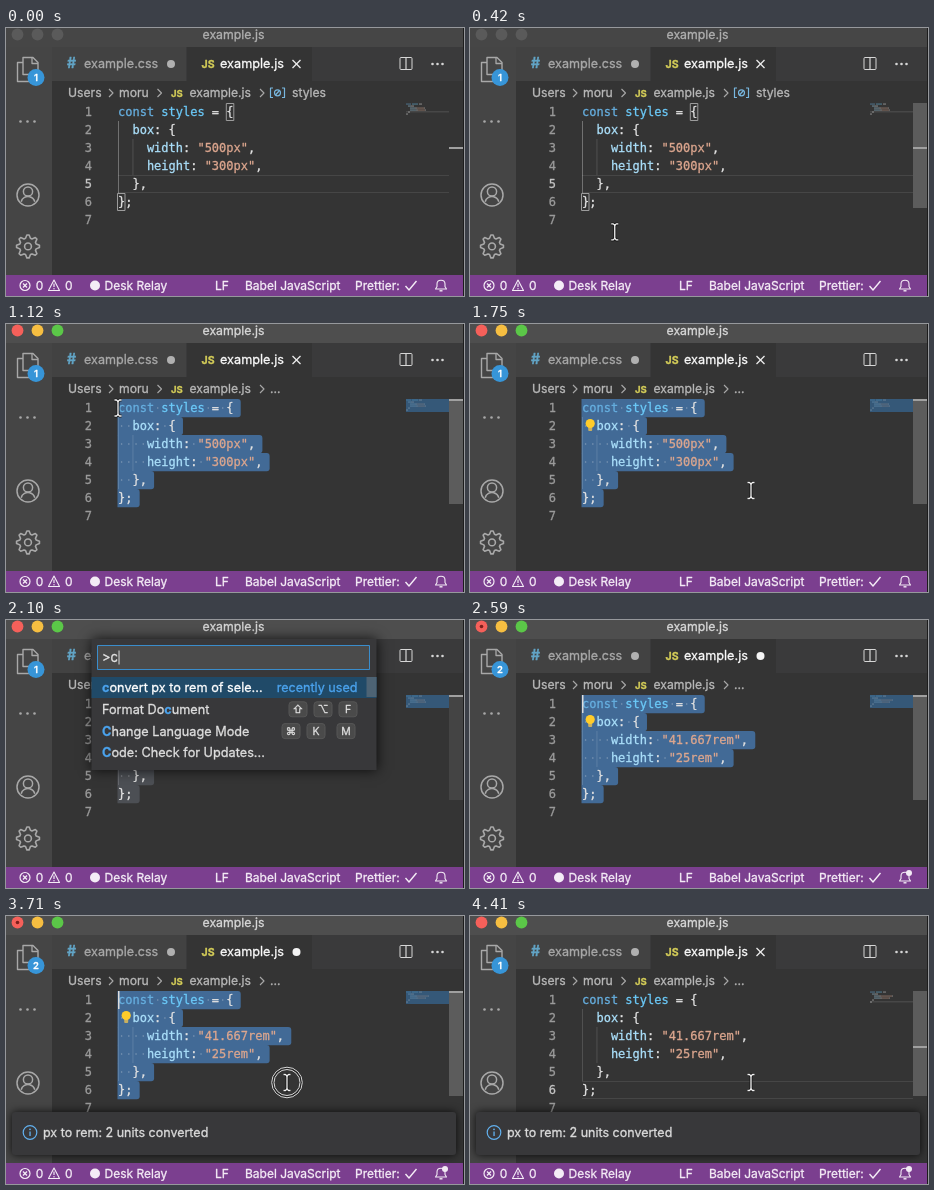
Recreate the animation shown at these times as an HTML page with a canvas. Size 458x268 px, loop 4480 ms.

```html
<!DOCTYPE html>
<html lang="en">
<head>
<meta charset="utf-8">
<title>Unit conversion in an editor</title>
<style>
html, body { margin: 0; width: 100%; height: 100%; overflow: hidden; background: #343434; }
canvas { display: block; width: 458px; height: 268px; }
</style>
</head>
<body>
<canvas id="stage"></canvas>
<script>
const W = 458, H = 268, LOOP = 4480, STEP = 70;
const UI = 'Inter, "Open Sans", sans-serif';
const MONO = '"DejaVu Sans Mono", monospace';
const CHAR = 7.22, LINE = 18, LEFT = 112, TOP = 75;
const C = {
  title: '#4e4e4e', bar: '#454545', strip: '#3a3a3b', tab: '#424242', editor: '#343434',
  panel: '#38383a', status: '#7b3f8f', select: '#426a96', blurred: '#4c4f54',
  text: '#e2e2e2', dim: '#a8a8a8', keyword: '#66afe0', name: '#6bc9f8', prop: '#aadffa',
  string: '#dca68e', blue: '#4ba3ee', js: '#d3cc58'
};
const canvas = document.getElementById('stage');
const g = canvas.getContext('2d');
const ratio = Math.max(1, window.devicePixelRatio || 1);
canvas.width = W * ratio;
canvas.height = H * ratio;

const rect = (x, y, w, h, color) => { g.fillStyle = color; g.fillRect(x, y, w, h); };

function round(x, y, w, h, r, fill, stroke) {
  g.beginPath();
  g.roundRect(x, y, w, h, r);
  if (fill) { g.fillStyle = fill; g.fill(); }
  if (stroke) { g.strokeStyle = stroke; g.lineWidth = 1; g.stroke(); }
}

function circle(x, y, r, fill, stroke, width = 1.2) {
  g.beginPath();
  g.arc(x, y, r, 0, Math.PI * 2);
  if (fill) { g.fillStyle = fill; g.fill(); }
  if (stroke) { g.strokeStyle = stroke; g.lineWidth = width; g.stroke(); }
}

function path(points, color, width = 1.2, closed = false) {
  g.beginPath();
  points.forEach(([x, y], i) => i ? g.lineTo(x, y) : g.moveTo(x, y));
  if (closed) g.closePath();
  g.strokeStyle = color;
  g.lineWidth = width;
  g.stroke();
}

// A hairline outline gives the slightly heavier look of smoothed type.
function text(str, x, y, size = 12, color = C.text, { align = 'left', font = UI, weight = 400 } = {}) {
  g.font = `${weight} ${size}px ${font}`;
  g.textAlign = align;
  g.fillStyle = g.strokeStyle = color;
  g.lineWidth = .3;
  g.fillText(str, x, y);
  g.strokeText(str, x, y);
  return x + g.measureText(str).width;
}

function dots(x, y, color, gap = 6) {
  for (let i = -1; i <= 1; i++) circle(x + i * gap, y, 1.3, color);
}

function withShadow(blur, draw) {
  g.save();
  g.shadowColor = 'rgba(0,0,0,.8)';
  g.shadowBlur = blur * ratio;
  draw();
  g.restore();
}

const lineTop = n => TOP + (n - 1) * LINE;

function codeLines(converted) {
  const [w, h] = converted ? ['41.667rem', '25rem'] : ['500px', '300px'];
  const entry = (key, value) =>
    [['    ' + key, C.prop], [': ', C.text], [`"${value}"`, C.string], [',', C.text]];
  return [
    [['const', C.keyword], [' styles', C.name], [' = {', C.text]],
    [['  box', C.prop], [': {', C.text]],
    entry('width', w),
    entry('height', h),
    [['  },', C.text]],
    [['};', C.text]],
    []
  ];
}

// Pointer track: time, x, y
const track = [
  [210, 300, 268], [490, 116, 192], [630, 114, 191], [770, 133, 150],
  [840, 141, 94], [980, 112, 84], [1120, 112, 84], [1540, 281, 166.5]
];

function pointerAt(t) {
  let i = track.findIndex(p => p[0] > t);
  if (i < 0) return track[track.length - 1].slice(1);
  i = Math.max(1, i);
  const [t0, x0, y0] = track[i - 1], [t1, x1, y1] = track[i];
  const u = Math.max(0, (t - t0) / (t1 - t0)), e = u * u * (3 - 2 * u);
  return [x0 + (x1 - x0) * e, y0 + (y1 - y0) * e];
}

function selectionAt(t) {
  if (t < 840 || t >= 3850) return null;
  if (t < 910) return [6, 2];
  return t < 980 ? [2, 2] : [1, 0];
}

function stateAt(t) {
  const converted = t >= 2520;
  const selection = selectionAt(t);
  const line = selection ? 0 : t < 560 ? 5 : t < 840 ? 7 : 6;
  return {
    t, converted, selection, line,
    focused: t >= 560,
    dirty: converted && t < 4200,
    caretLine: selection ? selection[0] : line,
    palette: t >= 1890 && t < 2520,
    typed: t >= 2100 ? '>c' : '>',
    hover: t >= 280,
    pointer: (t >= 210 && t < 1820) || t >= 3570,
    pressed: (t >= 560 && t < 1120) || (t >= 3640 && t < 3850),
    toast: Math.min(1, Math.max(0, (t - 2800) / 280))
  };
}

function drawTitle(s) {
  rect(0, 0, W, 19, s.focused ? C.title : '#464646');
  const lights = s.focused ? ['#f5605a', '#f6be41', '#5bc748'] : ['#5a5a5a', '#5a5a5a', '#5a5a5a'];
  lights.forEach((c, i) => circle(11.5 + i * 20, 6.5, 5.9, c));
  if (s.dirty) circle(11.5, 6.5, 1.8, '#7c1f1b');
  text('example.js', 227.5, 11, 12.3, s.focused ? '#d8d8d8' : '#b0b0b0', { align: 'center' });
}

function drawActivity(s) {
  rect(0, 19, 46, 228, C.bar);
  const ink = '#a8a8a8';
  path([[17, 46.5], [17, 29.5], [27, 29.5], [32, 34.5], [32, 46.5]], ink, 1.4, true);
  path([[26, 29.5], [26, 35.5], [32, 35.5]], ink, 1.3);
  path([[17, 34.5], [11.5, 34.5], [11.5, 53.5], [25, 53.5], [25, 47.5]], ink, 1.4);
  circle(30, 49.4, 8.5, '#3795d8');
  text(s.dirty ? '2' : '1', 30, 52.8, 9.5, '#fff', { align: 'center', weight: 600 });
  dots(21.5, 93.5, ink, 7);
  circle(22, 167, 11, null, ink, 1.5);
  circle(22, 163.5, 4.6, null, ink, 1.5);
  g.beginPath();
  g.arc(22, 175.5, 7, Math.PI * 1.08, Math.PI * 1.92);
  g.stroke();
  const gear = [];
  for (let i = 0; i < 32; i++) {
    const a = (i - .5) * Math.PI / 16, r = i % 4 < 2 ? 11.5 : 8.5;
    gear.push([22 + r * Math.cos(a), 218.4 + r * Math.sin(a)]);
  }
  path(gear, ink, 1.6, true);
  circle(22, 218.4, 3.4, null, ink, 1.6);
}

function drawTabs(s) {
  rect(46, 19, W - 46, 34, C.strip);
  rect(46, 19, 134, 34, C.tab);
  rect(181, 19, 125, 34, C.editor);
  text('#', 61, 40.3, 14, '#62a4c5', { weight: 700 });
  text('example.css', 78, 39.8, 12.6, C.dim);
  circle(165, 36, 4, '#b0b0b0');
  text('JS', 195.5, 39.5, 10.5, C.js, { weight: 700 });
  text('example.js', 214, 39.8, 12.7, '#fafafa');
  if (s.dirty) circle(290.5, 36, 4, '#f4f4f4');
  else {
    path([[286.5, 32], [294.5, 40]], '#eee', 1.3);
    path([[294.5, 32], [286.5, 40]], '#eee', 1.3);
  }
  round(394, 29.5, 12, 12, 1, null, '#d6d6d6');
  path([[400, 29.5], [400, 41.5]], '#d6d6d6');
  dots(431.5, 36, '#d6d6d6', 5);
}

function chevron(x) {
  path([[x - 2, 61], [x + 2, 65], [x - 2, 69]], C.dim, 1.1);
}

function drawBreadcrumb(s) {
  const crumb = (str, x) => text(str, x, 69, 12.2, '#b8b8b8');
  crumb('Users', 62);
  chevron(105);
  crumb('moru', 113);
  chevron(153.5);
  text('JS', 165, 68.5, 9.5, C.js, { weight: 700 });
  crumb('example.js', 183.5);
  chevron(256);
  if (s.focused) return void crumb('...', 264);
  path([[267, 60], [264.5, 60], [264.5, 69.5], [267, 69.5]], '#78b7df');
  path([[276, 60], [278.5, 60], [278.5, 69.5], [276, 69.5]], '#78b7df');
  circle(271.5, 64.8, 3, null, '#78b7df');
  path([[269.5, 67], [273.5, 62.5]], '#78b7df');
  crumb('styles', 286);
}

function drawMinimap(s, lines) {
  const all = s.selection && s.selection[0] === 1;
  if (all) rect(400, 75, 43, 13, '#355878');
  else rect(400, 75 + (s.caretLine - 1) * 2, 43, 1.5, s.selection ? '#3c5b7a' : '#474747');
  lines.forEach((line, i) => {
    let x = 400;
    for (const [str, color] of line) {
      const body = str.trimStart();
      x += str.length - body.length;
      g.globalAlpha = all ? .25 : .45;
      rect(x, 75.5 + i * 2, body.length, 1.1, color);
      g.globalAlpha = 1;
      x += body.length;
    }
  });
  if (s.hover) rect(443, 75, 15, 105, s.palette ? '#444' : '#5c5c5c');
  rect(443, 75 + (s.caretLine - 1) * 11, 15, 2, '#a0a0a0');
}

function drawBulb() {
  round(118.2, 102.5, 4, 4.5, 1, '#c8b060');
  circle(120.2, 99.5, 4.6, '#ffcc2a');
}

function drawEditor(s) {
  rect(46, 53, W - 46, 194, C.editor);
  const lines = codeLines(s.converted);
  const lengths = lines.map(l => l.reduce((n, [str]) => n + str.length, 0));
  drawBreadcrumb(s);

  if (s.line) {
    const y = lineTop(s.line);
    rect(LEFT, y, 331, 1, '#464646');
    rect(LEFT, y + 17, 331, 1, '#464646');
  }
  if (s.selection) {
    const [first, col] = s.selection;
    for (let n = first; n <= 6; n++) {
      const start = n === first ? col : 0;
      round(LEFT - .5 + start * CHAR, lineTop(n), (lengths[n - 1] - start + 1) * CHAR + .5, LINE + .3,
        [0, 3, 3, 0], s.palette ? C.blurred : C.select);
    }
  }
  rect(LEFT, lineTop(2), 1, LINE * 4, `rgba(255,255,255,${s.focused ? .14 : .3})`);
  rect(LEFT + 2 * CHAR, lineTop(3), 1, LINE * 2, 'rgba(255,255,255,.14)');

  lines.forEach((line, i) => {
    const n = i + 1, base = lineTop(n) + 13;
    text(String(n), 86, base, 12, n === s.line ? '#c4c4c4' : '#9a9a9a', { align: 'right', font: MONO });
    let col = 0;
    for (const [str, color] of line) {
      text(str, LEFT + col * CHAR, base, 12, color, { font: MONO });
      for (const ch of str) {
        if (ch === ' ' && s.selection && s.selection[0] <= n)
          circle(LEFT + (col + .5) * CHAR, base - 4, .8, 'rgba(225,230,235,.38)');
        col++;
      }
    }
  });

  if (!s.focused) {
    round(LEFT + 15 * CHAR, TOP + .5, 7.5, 17, 0, null, '#9c9c9c');
    round(LEFT - .5, lineTop(6) + .5, 7.5, 17, 0, null, '#9c9c9c');
  }
  if (s.t >= 840 && s.t < 910) rect(126, lineTop(6), 1, LINE, '#ccc');
  if (s.t >= 2520 && s.t < 3850 && (s.t - 2520) % 1000 < 500 || s.t >= 3640 && s.t < 3850)
    rect(LEFT, TOP, 1.5, LINE, '#ddd');
  if (s.t >= 3850 && s.t < 4340) rect(126, lineTop(6), 1.5, LINE, '#ddd');
  if (s.selection && s.t >= 1400) drawBulb();
  drawMinimap(s, lines);
}

function drawBell(alert) {
  const ink = '#f2eaf4';
  g.beginPath();
  g.moveTo(429.5, 261);
  g.lineTo(431, 258.5);
  g.lineTo(431, 256);
  g.bezierCurveTo(431, 251, 439, 251, 439, 256);
  g.lineTo(439, 258.5);
  g.lineTo(440.5, 261);
  g.closePath();
  g.strokeStyle = ink;
  g.lineWidth = 1.1;
  g.stroke();
  path([[433.5, 262.8], [436.5, 262.8]], ink, 1.4);
  if (alert) circle(439, 253, 3, ink);
}

function drawStatus(s) {
  rect(0, 247, W, 21, C.status);
  const ink = '#f4ecf6', label = (str, x) => text(str, x, 262, 12, ink);
  circle(19, 257.5, 5, null, ink);
  path([[17, 255.5], [21, 259.5]], ink);
  path([[21, 255.5], [17, 259.5]], ink);
  label('0', 29.8);
  path([[48, 252], [53.5, 262.5], [42.5, 262.5]], ink, 1.1, true);
  path([[48, 255.5], [48, 259]], ink);
  circle(48, 260.7, .7, ink);
  label('0', 59);
  circle(89, 257.5, 5, ink);
  label('Desk Relay', 98.5);
  label('LF', 209);
  label('Babel JavaScript', 239);
  label('Prettier:', 349);
  path([[399.5, 258], [403, 262], [410.5, 253]], ink, 1.4);
  drawBell(s.converted);
}

function drawToast(p) {
  if (!p) return;
  const ease = 1 - (1 - p) ** 3;
  g.save();
  g.beginPath();
  g.rect(0, 0, W, 247);
  g.clip();
  g.translate(0, (1 - ease) * 50);
  withShadow(8, () => round(6, 196, 444, 43, 3, C.panel));
  circle(24, 216.5, 6.8, null, '#62b1ef', 1.2);
  rect(23.4, 215.5, 1.3, 4.5, '#62b1ef');
  circle(24, 213.3, .9, '#62b1ef');
  text('px to rem: 2 units converted', 37, 221, 12.5, '#dadada');
  g.restore();
}

const commands = [
  { label: 'convert px to rem of sele...', hit: 0 },
  { label: 'Format Document', hit: 9, keys: [['⇧', 283], ['⌥', 308], ['F', 333]] },
  { label: 'Change Language Mode', hit: 0, keys: [['⌘', 276], ['K', 301], ['M', 331]] },
  { label: 'Code: Check for Updates...', hit: 0 }
];

function drawPalette(s) {
  if (!s.palette) return;
  withShadow(12, () => rect(85.5, 19, 285, 131, C.panel));
  rect(92, 25, 272, 25, '#4b4b4b');
  g.strokeStyle = '#3a8dcc';
  g.lineWidth = 1;
  g.strokeRect(91.5, 25.5, 272, 24);
  const caret = text(s.typed, 96, 42.3, 13, '#e4e4e4');
  rect(caret + .5, 30.5, 1, 14, '#ddd');
  rect(85.5, 57, 285, 21, '#204a68');
  rect(360.5, 57, 10, 20, '#4d6374');
  commands.forEach(({ label, hit, keys = [] }, i) => {
    const y = 72 + i * 21.8;
    const color = i ? '#dedede' : '#fff';
    if (s.typed === '>') text(label, 96, y, 12.7, color);
    else {
      let x = text(label.slice(0, hit), 96, y, 12.7, color);
      x = text(label[hit], x, y, 12.7, C.blue, { weight: 700 });
      text(label.slice(hit + 1), x, y, 12.7, color);
    }
    for (const [key, x] of keys) {
      round(x, y - 12, 18, 15, 3, '#4a4a4a', '#565656');
      text(key, x + 9, y - .5, 10.5, '#e0e0e0', { align: 'center', font: 'Inter, "DejaVu Sans", sans-serif' });
    }
  });
  text('recently used', 351.5, 72, 12.6, C.blue, { align: 'right' });
}

function drawPointer(s) {
  if (!s.pointer) return;
  const [x, y] = pointerAt(s.t);
  if (s.pressed) {
    circle(x, y, 14.2, null, '#242424', 3);
    circle(x, y, 15.3, null, '#d8d8d8', 1);
    circle(x, y, 13, null, '#d8d8d8', 1);
  }
  for (const [color, width] of [['#181818', 3], ['#f2f2f2', 1.3]]) {
    path([[x, y - 7], [x, y + 7]], color, width);
    for (const d of [-1, 1])
      path([[x - 3.5, y + d * 8], [x - 1.5, y + d * 8], [x, y + d * 6.5],
            [x + 1.5, y + d * 8], [x + 3.5, y + d * 8]], color, width);
  }
}

function draw(now) {
  const s = stateAt(Math.floor((now % LOOP) / STEP) * STEP);
  g.setTransform(ratio, 0, 0, ratio, 0, 0);
  g.lineJoin = 'round';
  drawEditor(s);
  drawTabs(s);
  drawTitle(s);
  drawActivity(s);
  drawStatus(s);
  drawToast(s.toast);
  drawPalette(s);
  drawPointer(s);
  rect(457, 0, 1, H, '#1c1c1c');
}

const begin = performance.now();
function frame() {
  draw(performance.now() - begin);
  requestAnimationFrame(frame);
}
frame();
</script>
</body>
</html>
```
